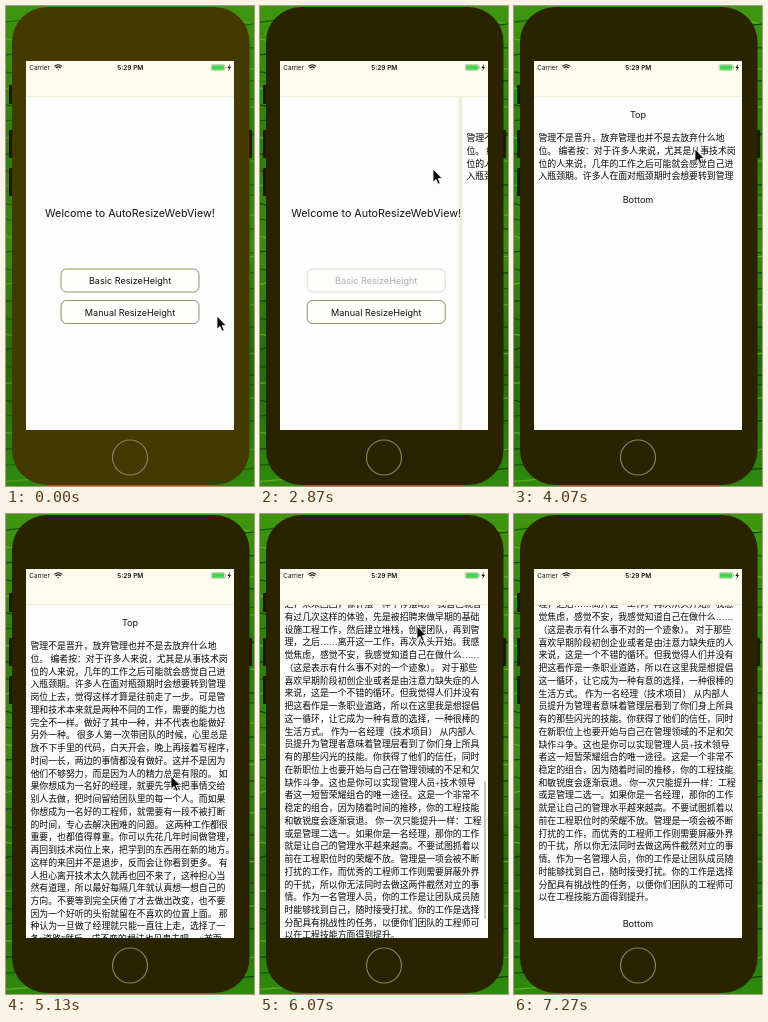
These frames come from a looping animation (248 px wide and 480 px high, 7340 ms). An HTML page:

```html
<!DOCTYPE html>
<html lang="zh-CN">
<head>
<meta charset="utf-8">
<title>AutoResizeWebView</title>
<style>
html, body { margin: 0; width: 100%; height: 100%; overflow: hidden; background: #2c7a0c; }
svg { display: block; width: 100vw; height: 100vh; }
text { font-family: Inter, Roboto, sans-serif; fill: #111; }
.mid { text-anchor: middle; }
.label { font-size: 9.1px; }
.article text { font: 8.87px "Liberation Serif", "Noto Sans CJK SC", "Noto Sans CJK", serif; fill: #080808; white-space: pre; }
.key { fill: #fefefc; stroke: #77733a; stroke-width: .8; }
</style>
</head>
<body>
<svg viewBox="0 0 248 480">
  <defs>
    <linearGradient id="grass" x2="0" y2="1">
      <stop offset="0" stop-color="#3f9610"/>
      <stop offset=".3" stop-color="#2c7f0c"/>
      <stop offset=".5" stop-color="#3d8b12"/>
      <stop offset=".75" stop-color="#246a0a"/>
      <stop offset="1" stop-color="#2f8a0e"/>
    </linearGradient>
    <linearGradient id="shade">
      <stop offset="0" stop-color="#b8b060" stop-opacity="0"/>
      <stop offset="1" stop-color="#b8b060" stop-opacity=".3"/>
    </linearGradient>
    <clipPath id="screen"><rect x="20" y="55" width="208" height="369"/></clipPath>
    <clipPath id="body"><rect x="20" y="91" width="208" height="333"/></clipPath>
  </defs>

  <rect width="248" height="480" fill="url(#grass)"/>
  <g id="blades" fill="none" stroke-width="1.3"></g>

  <g fill="#1c1800">
    <rect x="3" y="79" width="4" height="19" rx="1"/>
    <rect x="3" y="124" width="4" height="28" rx="1"/>
    <rect x="3" y="162" width="4" height="28" rx="1"/>
    <rect x="242" y="124" width="4" height="28" rx="1"/>
  </g>
  <rect id="phone" x="6" y="1" width="237.5" height="478" rx="35"/>
  <circle cx="124" cy="451.5" r="17.5" fill="none" stroke="#85805f" stroke-width="1.2"/>

  <rect x="20" y="55" width="208" height="369" fill="#fdfdfd"/>
  <g clip-path="url(#body)">
    <g id="home">
      <text class="mid" x="124" y="211" font-size="10.75">Welcome to AutoResizeWebView!</text>
      <g id="basic">
        <rect class="key" x="55" y="263" width="138" height="23" rx="5.5"/>
        <text class="mid label" x="124" y="278">Basic ResizeHeight</text>
      </g>
      <rect class="key" x="55" y="294.5" width="138" height="23" rx="5.5"/>
      <text class="mid label" x="124" y="309.5">Manual ResizeHeight</text>
    </g>
    <g id="page">
      <rect x="15" y="91" width="5" height="333" fill="url(#shade)"/>
      <rect x="20" y="91" width="208" height="333" fill="#fdfdfd"/>
      <g id="scroll">
        <text class="mid label" x="124" y="111.5">Top</text>
        <g id="article" class="article"></g>
        <text id="bottom" class="mid label" x="124">Bottom</text>
      </g>
      <rect id="bar" x="224.2" width="1.5" rx=".75" fill="#77776a"/>
    </g>
  </g>

  <g clip-path="url(#screen)">
    <rect x="20" y="55" width="208" height="36" fill="#fcfbee"/>
    <rect x="20" y="90.6" width="208" height=".5" fill="#dedbc0"/>
    <text x="23.3" y="63.7" font-size="6.3">Carrier</text>
    <g fill="none" stroke="#111" stroke-width="1.1">
      <path d="M48.3 60.4q3.9-3.4 7.8 0M49.7 62q2.5-2.2 5 0"/>
      <path d="M51.2 63.3l1 1 1-1z" fill="#111" stroke="none"/>
    </g>
    <text class="mid" x="124.3" y="63.9" font-size="6.5" font-weight="600">5:29 PM</text>
    <rect x="205.2" y="58.6" width="13.6" height="5.8" rx="1.3" fill="none" stroke="#8c9c78" stroke-width=".5"/>
    <rect x="206" y="59.3" width="12" height="4.4" rx=".7" fill="#45d24f"/>
    <rect x="219.3" y="60.5" width=".8" height="2" fill="#8c9c78"/>
    <path d="M224 58l-2.6 4h1.6l-.7 3 2.7-4h-1.6z" fill="#111"/>
  </g>

  <path id="cursor" d="M0 0V13.2L3 10.4 5 15.2 7.2 14.3 5.2 9.6H9.2Z" fill="#050505" stroke="#fff" stroke-width=".8"/>
</svg>
<script>
const LOOP = 7340, LINE = 12.74, FIRST = 132, END = 449.5;
const lines = `管理不是晋升，放弃管理也并不是去放弃什么地
位。 编者按：对于许多人来说，尤其是从事技术岗
位的人来说，几年的工作之后可能就会感觉自己进
入瓶颈期。许多人在面对瓶颈期时会想要转到管理
岗位上去，觉得这样才算是往前走了一步。可是管
理和技术本来就是两种不同的工作，需要的能力也
完全不一样。做好了其中一种，并不代表也能做好
另外一种。 很多人第一次带团队的时候，心里总是
放不下手里的代码，白天开会，晚上再接着写程序，
时间一长，两边的事情都没有做好。这并不是因为
他们不够努力，而是因为人的精力总是有限的。 如
果你想成为一名好的经理，就要先学会把事情交给
别人去做，把时间留给团队里的每一个人。而如果
你想成为一名好的工程师，就需要有一段不被打断
的时间，专心去解决困难的问题。 这两种工作都很
重要，也都值得尊重。你可以先花几年时间做管理，
再回到技术岗位上来，把学到的东西用在新的地方。
这样的来回并不是退步，反而会让你看到更多。 有
人担心离开技术太久就再也回不来了，这种担心当
然有道理，所以最好每隔几年就认真想一想自己的
方向。不要等到完全厌倦了才去做出改变，也不要
因为一个好听的头衔就留在不喜欢的位置上面。 那
种认为一旦做了经理就只能一直往上走，选择了一
条“道路”然后一成不变的想法也见鬼去吧。 “兼而
有之，来回摆动”： 最好的前线工程管理人员是那
些离开实际操作工作不超过 2-3 年，曾经全身心铺
在前线工作的人员，与此同时最好的个人技术主管
（tech lead）又是那些曾经做过管理工作的人。归
根到底，最好的技术领域领导人往往是两者兼而有
之，来来回回，像钟摆一样不停摆动。 我自己就曾
有过几次这样的体验，先是被招聘来做早期的基础
设施工程工作，然后建立堆栈，创建团队，再到管
理，之后……离开这一工作，再次从头开始。我感
觉焦虑，感觉不安，我感觉知道自己在做什么……
（这是表示有什么事不对的一个迹象）。 对于那些
喜欢早期阶段初创企业或者是由注意力缺失症的人
来说，这是一个不错的循环。但我觉得人们并没有
把这看作是一条职业道路，所以在这里我是想提倡
这一循环，让它成为一种有意的选择，一种很棒的
生活方式。 作为一名经理（技术项目） 从内部人
员提升为管理者意味着管理层看到了你们身上所具
有的那些闪光的技能。你获得了他们的信任，同时
在新职位上也要开始与自己在管理领域的不足和欠
缺作斗争。这也是你可以实现管理人员+技术领导
者这一短暂荣耀组合的唯一途径。这是一个非常不
稳定的组合，因为随着时间的推移，你的工程技能
和敏锐度会逐渐衰退。 你一次只能提升一样：工程
或是管理二选一。如果你是一名经理，那你的工作
就是让自己的管理水平越来越高。不要试图抓着以
前在工程职位时的荣耀不放。管理是一项会被不断
打扰的工作，而优秀的工程师工作则需要屏蔽外界
的干扰，所以你无法同时去做这两件截然对立的事
情。作为一名管理人员，你的工作是让团队成员随
时能够找到自己，随时接受打扰。你的工作是选择
分配具有挑战性的任务，以便你们团队的工程师可
以在工程技能方面得到提升。`.split("\n");

const $ = id => document.getElementById(id);
const NS = "http://www.w3.org/2000/svg";
const set = (el, attrs) => { for (const k in attrs) el.setAttribute(k, attrs[k]); return el; };
const add = (parent, tag, attrs) => parent.appendChild(set(document.createElementNS(NS, tag), attrs));
const ramp = (t, a, b) => Math.min(1, Math.max(0, (t - a) / (b - a)));
const smooth = u => u * u * (3 - 2 * u);

let seed = 7;
const rnd = () => (seed = seed * 16807 % 2147483647) / 2147483647;
for (let i = 0; i < 60; i++) {
  const y = i * 8.2, dy = rnd() * 16 - 8;
  add($("blades"), "path", {
    d: `M${i % 2 ? 205 : -2} ${y}q22 ${dy} 46 ${dy * 1.5}`,
    stroke: ["#0c3604", "#67b51f", "#154c07"][i % 3]
  });
}

const rows = lines.map((s, i) => {
  const row = add($("article"), "text", { x: 24.5, y: FIRST + i * LINE + 3.2 });
  row.textContent = s;
  return row;
});
const lastRow = FIRST + (lines.length - 1) * LINE;

// time, x, y of the pointer
const path = [
  [0, 211, 310], [350, 211, 310], [850, 158, 276], [1100, 158, 276], [1500, 173, 163],
  [3450, 173, 163], [3900, 181, 143], [4400, 181, 143], [5000, 165, 262], [5200, 165, 262]
];
function pointer(t) {
  if (t >= 5200) {
    const u = ramp(t, 5200, 5500) ** 1.5, out = smooth(ramp(t, 6700, 7150));
    return [165 - 8 * u + 110 * out, 262 - 150 * u + 60 * out];
  }
  const i = path.findIndex(p => p[0] > t);
  const [a, b] = [path[i - 1] || path[0], path[i] || path[path.length - 1]];
  const u = smooth(ramp(t, a[0], b[0]));
  return [a[1] + (b[1] - a[1]) * u, a[2] + (b[2] - a[2]) * u];
}

// drag, then decelerating fling, then a small bounce at the end
function scrollAt(t) {
  if (t < 5500) return 150 * ramp(t, 5200, 5500) ** 1.5;
  const fling = s => 150 + 384 * (1 - Math.exp(-(s - 5500) / 500));
  const hit = 5500 - 500 * Math.log(1 - (END - 150) / 384);
  if (t < hit) return fling(t);
  const s = (t - hit) / 1000;
  return END + 165 * s * Math.exp(-s * 12);
}

function draw(t) {
  const push = 1 - (1 - ramp(t, 2850, 3330)) ** 3;
  const full = t >= 4400, y = scrollAt(t);
  set($("phone"), { fill: t < 70 ? "#443900" : "#2a2300" });
  set($("blades"), { opacity: t < 70 ? .55 : .85 });
  set($("home"), { transform: `translate(${-62 * push})` });
  set($("basic"), { opacity: t < 1000 ? 1 : .2 + .8 * ramp(t, 2800, 3300) });
  set($("page"), { transform: `translate(${208 * (1 - push)})`, visibility: push ? "visible" : "hidden" });
  set($("scroll"), { transform: `translate(0 ${-y})` });
  rows.forEach((r, i) => set(r, { visibility: push && (full || i < 4) ? "visible" : "hidden" }));
  set($("bottom"), { y: full ? lastRow + 30 : 197 });
  const size = 138 - Math.max(0, y - END);
  set($("bar"), {
    y: 93 + 190 * Math.min(1, y / END) + 138 - size, height: size,
    opacity: .55 * ramp(t, 5200, 5260) * (1 - ramp(t, 6750, 7000))
  });
  set($("cursor"), { transform: `translate(${pointer(t)})` });
}

function tick() {
  draw(performance.now() % LOOP);
  requestAnimationFrame(tick);
}
tick();
</script>
</body>
</html>
```
